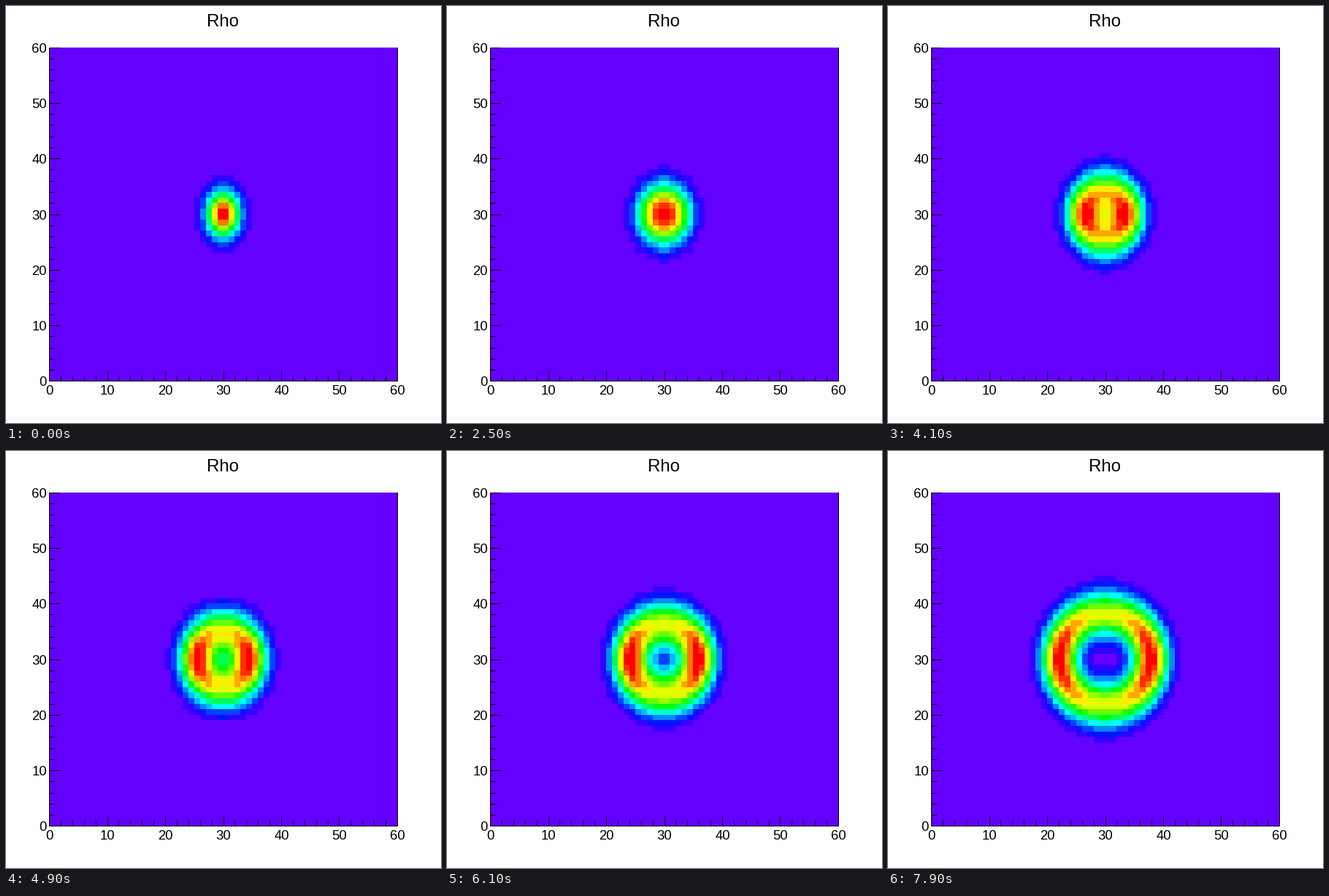
These frames come from a looping animation (596x572 px, 8 s). A matplotlib script:

```python
import colorsys

import matplotlib.pyplot as plt
import numpy as np
from matplotlib.animation import FuncAnimation

WIDTH, HEIGHT, DPI = 596, 572, 100
FRAMES, INTERVAL = 80, 100
CELLS, LEVELS = 60, 20
LEFT, RIGHT, TOP, BOTTOM = 59, 536, 57, 514

# Density: a gaussian blob whose matter streams out evenly in all directions
VAR_X, VAR_Y = 4.0, 8.14
SPEED = 0.105


def px(value):
    return 0.1 * WIDTH + 0.8 * WIDTH * value / CELLS


def py(value):
    return 0.9 * HEIGHT - 0.8 * HEIGHT * value / CELLS


def level_color(level):
    step = int((level + 0.99) * 50 / LEVELS)
    hue = 280 - 5.6 * (step + 1)
    return [round(255 * c) for c in colorsys.hls_to_rgb(max(hue, 0) / 360, 0.5, 1)]


PALETTE = np.array([level_color(k) for k in range(LEVELS)], dtype=np.uint8)
CENTERS = np.arange(CELLS) + 0.5 - CELLS / 2
ANGLES = np.linspace(0, 2 * np.pi, 180, endpoint=False)

# Cell index of every pixel column and row inside the plot
COLS = np.arange(LEFT, RIGHT)
ROWS = np.arange(TOP, BOTTOM)
col_edges = np.floor(px(np.arange(CELLS + 1)) + 1e-6)
row_edges = np.floor(py(np.arange(CELLS, -1, -1)) + 1e-6)
COL_CELL = np.clip(np.searchsorted(col_edges, COLS, "right") - 1, 0, CELLS - 1)
ROW_CELL = np.clip(np.searchsorted(row_edges, ROWS, "right") - 1, 0, CELLS - 1)


def density(frame):
    radius = SPEED * (frame + 0.5)
    dx = CENTERS[None, :] - radius * np.cos(ANGLES)[:, None]
    dy = CENTERS[:, None] - radius * np.sin(ANGLES)[None, :]
    return np.exp(-dy**2 / (2 * VAR_Y)) @ np.exp(-dx**2 / (2 * VAR_X))


def draw_axes(canvas):
    canvas[TOP:BOTTOM + 1, LEFT] = 0
    canvas[TOP:BOTTOM + 1, RIGHT] = 0
    canvas[BOTTOM, LEFT:RIGHT + 1] = 0
    for value in range(0, CELLS + 1, 2):
        major = value % 10 == 0
        x, y = int(px(value) + 1e-6), int(py(value) + 1e-6)
        canvas[y, LEFT:LEFT + (15 if major else 8)] = 0
        canvas[BOTTOM - (13 if major else 7):BOTTOM, x] = 0


def render(frame):
    rho = density(frame)
    rho = (rho - rho.min()) / (rho.max() - rho.min())
    levels = np.minimum((rho * LEVELS).astype(int), LEVELS - 1)
    canvas = np.full((HEIGHT, WIDTH, 3), 255, dtype=np.uint8)
    canvas[TOP:BOTTOM, LEFT:RIGHT] = PALETTE[levels[np.ix_(ROW_CELL, COL_CELL)]]
    draw_axes(canvas)
    return canvas


fig = plt.figure(figsize=(WIDTH / DPI, HEIGHT / DPI), dpi=DPI, facecolor="white")
ax = fig.add_axes([0, 0, 1, 1])
ax.axis("off")
picture = ax.imshow(render(0), extent=(0, WIDTH, HEIGHT, 0),
                    interpolation="nearest", aspect="auto")
ax.set_xlim(0, WIDTH)
ax.set_ylim(HEIGHT, 0)


def label(x, y, text, size, align="center"):
    ax.text(x, y, text, fontsize=size * 72 / DPI, family="Liberation Sans",
            color="black", ha=align, va="baseline")


label(297, 28, "Rho", 24)
for tick in range(0, CELLS + 1, 10):
    label(px(tick), 533, str(tick), 18.5)
    label(56, py(tick) + 6.6, str(tick), 18.5, "right")


def update(frame):
    picture.set_data(render(frame))
    return [picture]


anim = FuncAnimation(fig, update, frames=FRAMES, interval=INTERVAL,
                     repeat=True, repeat_delay=0)
plt.show()
```
